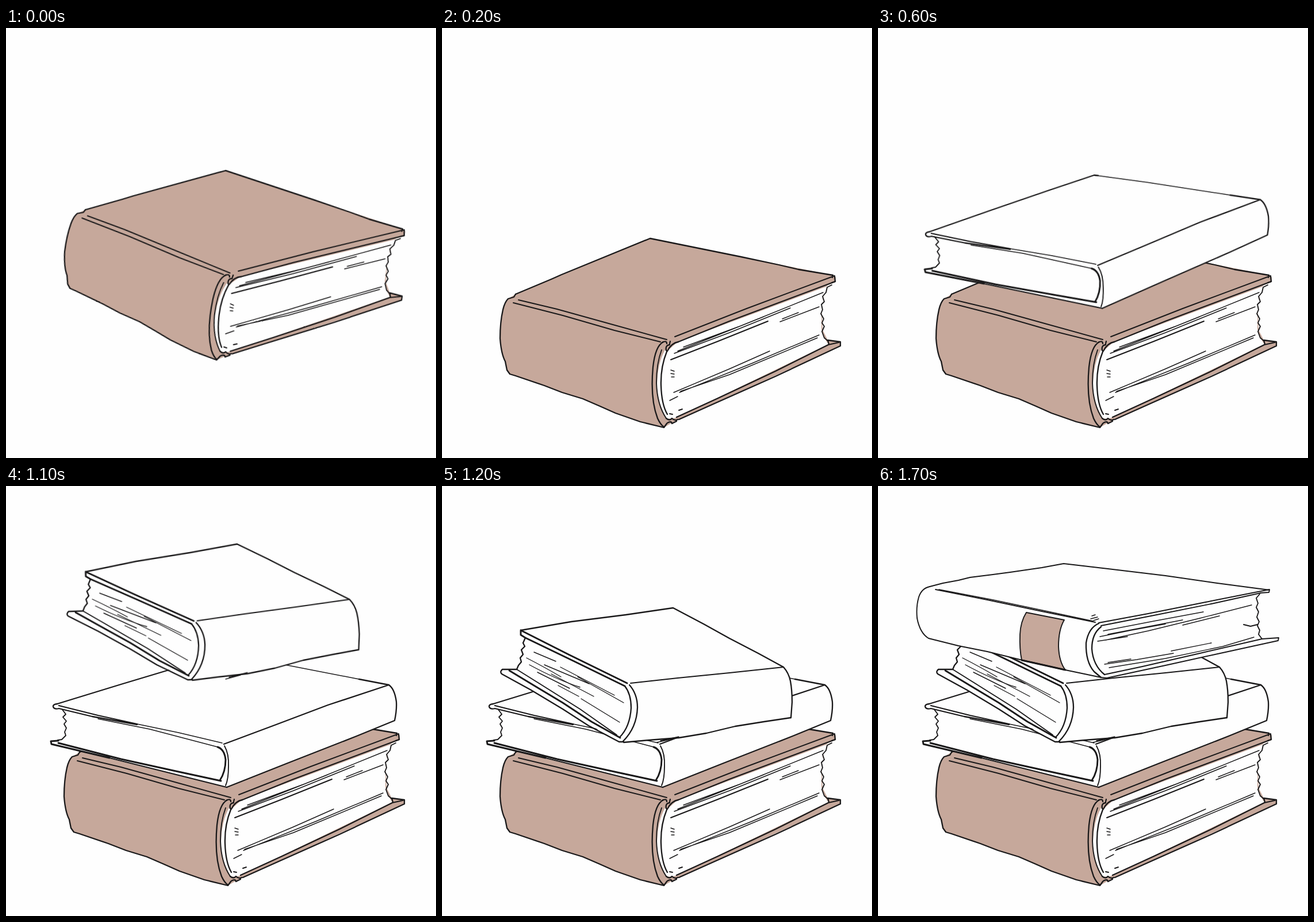
Write an HTML page that moves like this. It is 748x748 px and loops after 2800 ms.

```html
<!DOCTYPE html>
<html lang="en">
<head>
<meta charset="utf-8">
<title>Stacking books</title>
<style>
  html, body { margin: 0; width: 100%; height: 100%; overflow: hidden; background: #fefefe; }
  svg { display: block; width: 100%; height: 100%; }
  path { fill: none; stroke: #191819; stroke-width: 2.3; stroke-linecap: round; stroke-linejoin: round; }
  .thin { stroke-width: 1.4; }
  .mid { stroke-width: 1.9; }
  .bold { stroke-width: 2.9; }
  .tan { fill: #c6a89b; stroke: none; }
  .paper { fill: #fefefe; stroke: none; }

  .book { animation: 2800ms step-end infinite; }
  #b1 { transform-origin: 362px 366px; animation-name: drop1; }
  #b2 { transform-origin: 379px 292px; animation-name: drop2; }
  #b3 { transform-origin: 402px 212px; animation-name: drop3; }
  #b4 { transform-origin: 323px 135px; animation-name: drop4; }

  @keyframes drop1 {
    0% { transform: translate(20px, -118px) rotate(6.9deg); }
    3.5714% { transform: translate(10px, -56px) rotate(3.4deg); }
    7.1428%, 100% { transform: none; }
  }
  @keyframes drop2 {
    0% { visibility: hidden; transform: none; }
    21.4285% { visibility: visible; transform: translate(-3px, -36px) rotate(-2.27deg); }
    25%, 100% { visibility: visible; transform: none; }
  }
  @keyframes drop3 {
    0% { visibility: hidden; transform: none; }
    39.2857% { visibility: visible; transform: translate(0, -111px) rotate(-2deg); }
    42.8571%, 100% { visibility: visible; transform: none; }
  }
  @keyframes drop4 {
    0% { visibility: hidden; transform: none; }
    57.1428% { visibility: visible; transform: translate(0, -55px); }
    60.7142%, 100% { visibility: visible; transform: none; }
  }
</style>
</head>
<body>
<svg viewBox="0 0 748 748">

  <!-- thick tan book -->
  <g id="b1" class="book">
    <path class="tan" d="M362 366 L680 430 L685 434 L684 442 L670 448 L660 480 L662 525 L671 543 L693 546 L693 553 L408 683 L398 688 L386 695 L345 685 L302 670 L275 658 L245 645 L209 634 L178 622 L128 605 L118 602 L113 595 L110 580 Q103 567 101 540 Q101 512 106 490 Q109 477 115 471 L128 463 Z"/>
    <path class="paper" d="M392 562 L410 546 L676 447 L668 460 L662 470 L660 500 L660 524 L668 544 L672 550 L412 676 L400 680 L391 679 Q376 655 374 625 Q374 585 388 560 Z"/>
    <path d="M128 463 L190 437 L208 429 L362 366 L520 398 L586 412 L620 420 L680 430 L679 434 M683 432 L684 441 L678 443"/>
    <path d="M128 463 L125 468 L115 471 Q109 477 106 490 Q101 512 101 540 Q103 567 110 580 L113 595 L118 602 L128 605 L178 622 L209 634 L245 645 L275 658 L302 670 L345 685 L386 695 L391 688"/>
    <path class="mid" d="M405 537 L530 488 L683 431"/>
    <path d="M411 546 L500 510 L684 441"/>
    <path class="mid" d="M133 473 L200 489 L290 514 L391 542 M124 478 L210 500 L300 526 L380 546"/>
    <path d="M385 546 Q371 553 367 590 Q362 645 375 679 Q380 690 386 694"/>
    <path class="mid" d="M382 560 Q373 584 373 617 Q374 655 390 679"/>
    <path d="M391 563 Q380 590 381 622 Q382 655 392 672"/>
    <path d="M383 547 Q391 543 391 549 M390 561 Q388 552 396 551 M397 545 L396 549 M411 546 Q399 548 392 562"/>
    <path d="M390 679 Q396 684 400 679 Q405 684 410 681 M392 687 Q399 683 400 688 L408 684"/>
    <path d="M408 677 L480 644 L580 597 L672 551 L690 547 M412 681 L470 655 L580 606 L693 553 L693 546 L671 543 L673 550"/>
    <path class="mid" d="M678 447 L670 451 L668 460 L662 467 L665 476 L660 481 L662 490 L659 497 L664 506 L661 513 L665 519 L661 528 L665 539 L672 545"/>
    <path class="thin" d="M420 555 L520 518 L663 460 M404 566 L500 530 L606 487 M410 562 L560 502 M588 511 L656 485 M592 506 L620 495"/>
    <path class="thin" d="M403 634 L500 593 L570 562 M413 634 L540 583 L656 534 M396 648 L410 641 M415 632 L500 603 L653 539"/>
    <path class="thin" d="M398 595 L404 597 M398 601 L404 602 M399 607 L404 607"/>
    <path class="mid" d="M398 577 L480 545 L567 510 M396 671 L401 672 M412 665 L418 663"/>
  </g>

  <!-- slim white book -->
  <g id="b2" class="book">
    <path class="paper" d="M82 381 L379 292 L666 346 Q678 356 680 380 L677 408 L384 524 L78 449 L78 444 L92 442 L104 430 L98 389 L83 387 Z"/>
    <path d="M89 379 L200 345 L300 315 L379 292 L386 293 M614 336 L666 346 Q676 353 679 375 Q680 390 676 408 L610 435 L490 482 L384 524"/>
    <path class="thin" d="M379 292 L470 308 L614 336 M228 414 L300 429 L376 447 M160 405 L250 423 L372 455"/>
    <path d="M379 449 L470 415 L560 381 L666 346"/>
    <path d="M89 379 Q81 380 82 384 Q84 389 92 387 L150 401 L228 415 M92 382 L160 399 L228 414"/>
    <path class="mid" d="M98 389 L104 397 L99 402 L105 409 L101 414 L105 421 L102 428 L104 434 L97 441 L90 442"/>
    <path class="bold" d="M91 443 L78 444 L79 449 L180 473 M91 447 L200 475 L300 497 L374 513"/>
    <path d="M180 473 L280 498 L384 524"/>
    <path class="bold" d="M368 454 Q380 458 382 476 Q382 497 372 512"/>
    <path class="mid" d="M380 452 Q388 466 387 488 Q387 510 382 521"/>
  </g>

  <!-- turned white book -->
  <g id="b3" class="book">
    <path class="paper" d="M137 251 L402 212 L594 315 Q607 330 609 355 L607 403 L510 418 L420 438 L316 446 L308 445 L101 325 L102 320 L130 318 L145 265 L137 259 Z"/>
    <path d="M137 251 L225 236 L320 224 L402 212 L455 240 L500 265 L550 291 L594 315 Q603 325 606 339 Q609 355 609 376 L607 403"/>
    <path d="M607 403 L560 410 L510 418 L460 430 L412 438 L360 442 L316 446"/>
    <path class="mid" d="M328 343 L410 334 L500 325 L594 315"/>
    <path class="bold" d="M137 251 L137 259 L145 264 L230 305 L318 348 M137 251 L220 293 L322 343"/>
    <path d="M145 264 L141 273 L144 279 L138 285 L141 293 L136 299 L138 306 L133 312 L130 319"/>
    <path d="M130 319 L105 319 Q100 323 104 327 L155 355 L210 388 L255 417 L308 445 L316 445"/>
    <path class="bold" d="M117 321 L160 347 L210 377 L260 410 L310 438"/>
    <path class="mid" d="M130 319 L170 344 L240 388 L304 433"/>
    <path d="M318 348 Q329 362 329 386 Q327 419 309 437 M326 346 Q340 362 340 385 Q339 420 315 444"/>
    <path class="thin" d="M380 443 L412 436 M374 446 L400 440"/>
    <path class="thin" d="M160 289 L198 305 M147 299 Q180 316 207 332 M152 311 Q200 337 240 350 M178 311 L256 344 M206 315 L300 364 M236 332 L316 377"/>
    <path class="thin" d="M166 324 L222 352 M190 327 L264 366 M202 347 L238 366 M242 370 L309 411"/>
  </g>

  <!-- labelled book -->
  <g id="b4" class="book">
    <path class="paper" d="M90 175 L160 159 L230 150 L323 135 L500 155 L681 180 L680 185 L664 189 L660 240 L668 264 L697 264 L697 269 L400 334 L388 333 L247 302 L88 265 Q68 250 67 215 Q70 180 90 175 Z"/>
    <path class="tan" d="M258 220 L324 233 Q314 250 314 279 Q316 308 326 320 L250 303 Q246 280 247 256 Q250 232 258 220 Z"/>
    <path class="mid" d="M90 175 L113 169 L140 164 L160 159 L200 154 L230 150 L285 142 L323 135 L400 144 L500 156 L590 169 L681 181 L680 185 L665 186"/>
    <path class="mid" d="M90 175 Q76 178 71 193 Q66 210 68 230 Q73 256 88 265 L140 278 L190 288 L247 302 L326 320 L388 333"/>
    <path class="mid" d="M100 180 L190 198 L280 217 L378 237 M384 238 L470 222 L570 202 L681 180"/>
    <path class="thin" d="M106 180 L200 198 L290 217 L374 235"/>
    <path class="mid" d="M388 243 L480 225 L580 205 L666 186"/>
    <path class="mid" d="M258 220 Q248 236 247 258 Q246 284 250 303 L326 320 Q315 306 314 279 Q314 250 324 233 Z"/>
    <path class="bold" d="M250 303 L286 311 L326 320"/>
    <path d="M384 239 Q366 247 362 273 Q361 306 376 323 L388 333 M388 245 Q372 257 372 283 Q374 312 394 328"/>
    <path class="mid" d="M394 328 L460 314 L560 291 L668 266 L697 264 L696 269 L600 290 L500 312 L398 334 L388 333"/>
    <path class="mid" d="M664 188 L658 195 L661 204 L658 211 L662 219 L659 228 L663 236 L660 243 L664 251 L662 258 L668 266 M636 241 L648 244 L660 241"/>
    <path class="thin" d="M372 226 L378 224 M370 231 L382 228 M375 234 L384 231"/>
    <path class="thin" d="M392 252 L480 235 L566 219 M386 262 L440 251 L500 240 M382 270 L434 262 M400 258 L530 233 M396 268 L470 252 L560 230 L650 207 M530 242 L594 226"/>
    <path class="thin" d="M394 310 L450 302 L514 291 M402 316 L500 300 L600 279 L654 263 M400 307 L440 301 M510 287 L580 273"/>
  </g>
</svg>
</body>
</html>
```
